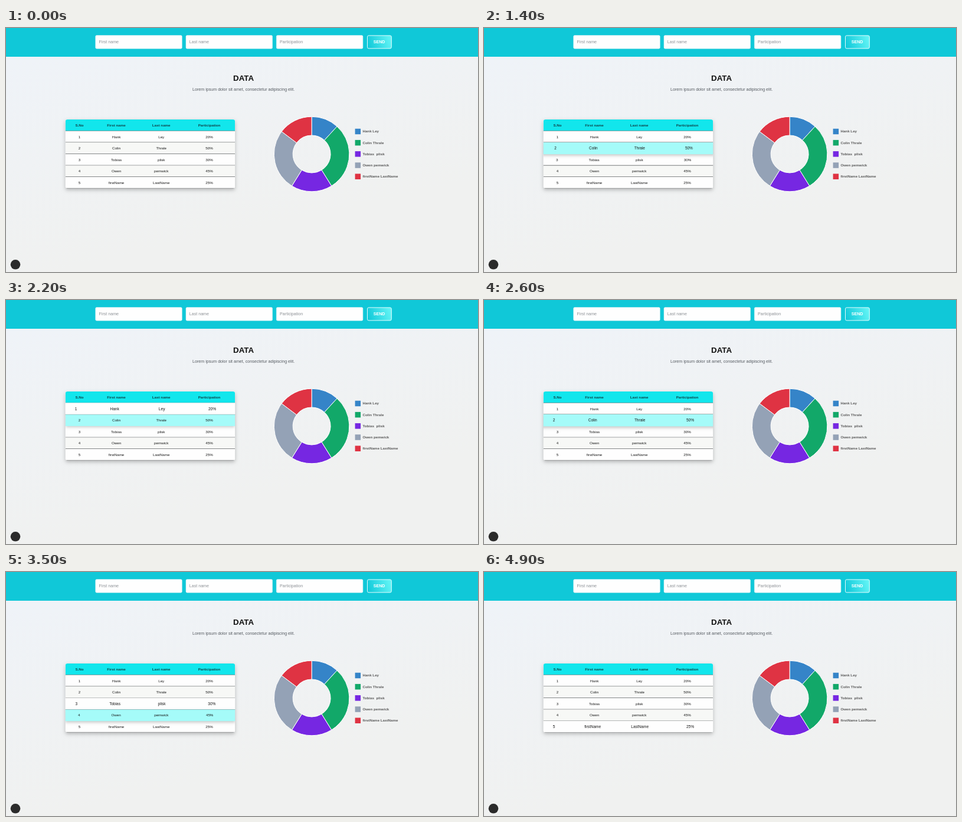
These frames come from a looping animation (800 px wide and 416 px high, 5000 ms). An HTML page with a canvas:

```html
<!DOCTYPE html>
<html lang="en">
<head>
<meta charset="utf-8">
<title>Participation data</title>
<style>
  html, body { margin: 0; width: 100%; height: 100%; overflow: hidden; }
  canvas { display: block; width: 800px; height: 416px; }
</style>
</head>
<body>
<canvas id="stage"></canvas>
<script>
const W = 800, H = 416, LOOP = 5000, STEP = 100;
const canvas = document.getElementById('stage');
const ctx = canvas.getContext('2d');
const dpr = window.devicePixelRatio || 1;
canvas.width = W * dpr;
canvas.height = H * dpr;

const people = [
  { first: 'Hank', last: 'Ley', share: 20, color: '#3584c8' },
  { first: 'Colin', last: 'Thrale', share: 50, color: '#12a869' },
  { first: 'Tobias', last: 'plisk', share: 30, color: '#7627e2', gap: '  ' },
  { first: 'Owen', last: 'pemwick', share: 45, color: '#94a2b6' },
  { first: 'firstName', last: 'LastName', share: 25, color: '#df3343' }
];

const table = { x: 100.7, y: 156, w: 287.5, head: 19.7, row: 19.6 };
const columns = [124.5, 187, 263.2, 344.5];

// When the pointer reaches each row (-1: leaves the table)
const visits = [
  [990, 3], [1150, 2], [1285, 1], [1520, 0], [2195, 1],
  [2800, 2], [3440, 3], [4280, 4], [4885, -1]
];
const GROW = 300, ZOOM = 0.05;

// cubic-bezier(.4, 0, .2, 1)
function ease(x) {
  if (x <= 0) return 0;
  if (x >= 1) return 1;
  let lo = 0, hi = 1;
  for (let i = 0; i < 20; i++) {
    const s = (lo + hi) / 2, r = 1 - s;
    if (1.2 * s * r * r + 0.6 * s * s * r + s * s * s < x) lo = s; else hi = s;
  }
  return lo * lo * (3 - 2 * lo);
}

function hoveredRow(t) {
  let row = -1;
  for (const [start, r] of visits) if (t >= start) row = r;
  return row;
}

// 0 at rest, 1 fully enlarged; leaving early shortens the way back
function rowGrowth(row, t) {
  let growth = 0;
  visits.forEach(([start, r], i) => {
    if (r !== row || t < start) return;
    const end = visits[i + 1][0];
    const peak = ease((Math.min(t, end) - start) / GROW);
    const back = t > end ? ease((t - end) / (GROW * peak)) : 0;
    growth = Math.max(growth, peak * (1 - back));
  });
  return growth;
}

function text(str, x, y, size, color, { bold = false, align = 'center' } = {}) {
  ctx.font = `${bold ? 'bold ' : ''}${size}px "Liberation Sans", Arial, sans-serif`;
  ctx.textAlign = align;
  ctx.textBaseline = 'alphabetic';
  ctx.fillStyle = color;
  ctx.fillText(str, x, y + size * 0.35);
}

function roundBox(x, y, w, h, r) {
  ctx.beginPath();
  ctx.roundRect(x, y, w, h, r);
}

function shadow(color, blur, dy) {
  ctx.shadowColor = color;
  ctx.shadowBlur = blur * dpr;
  ctx.shadowOffsetY = dy * dpr;
}

function gradient(x0, y0, x1, y1, from, to) {
  const g = ctx.createLinearGradient(x0, y0, x1, y1);
  g.addColorStop(0, from);
  g.addColorStop(1, to);
  return g;
}

function drawPage() {
  ctx.fillStyle = gradient(0, 49, 80, H, '#eff3f8', '#f0f1f0');
  ctx.fillRect(0, 0, W, H);
  ctx.fillStyle = '#10c8d8';
  ctx.fillRect(0, 0, W, 49);

  ['First name', 'Last name', 'Participation'].forEach((label, i) => {
    const x = 151.7 + i * 153.3;
    roundBox(x, 12.6, 146.6, 22.6, 2);
    ctx.fillStyle = '#fefefe';
    ctx.fill();
    ctx.strokeStyle = '#d3eff2';
    ctx.lineWidth = 0.6;
    ctx.stroke();
    text(label, x + 5.8, 23.8, 7.11, '#8d9196', { align: 'left' });
  });

  roundBox(612.5, 12.9, 40.8, 22, 2.2);
  ctx.fillStyle = gradient(614, 30, 652, 18, '#12cada', '#62f4f5');
  ctx.fill();
  ctx.strokeStyle = '#eafcfd';
  ctx.lineWidth = 1;
  ctx.stroke();
  text('SEND', 632.6, 23.9, 7.11, '#fff', { bold: true });

  text('DATA', 402.6, 85.2, 13.33, '#111', { bold: true });
  text('Lorem ipsum dolor sit amet, consectetur adipiscing elit.',
    402.6, 104.9, 7.11, '#555a60');

  ctx.beginPath();
  ctx.arc(16, 403.3, 8.3, 0, Math.PI * 2);
  ctx.fillStyle = '#2b2b2b';
  ctx.fill();
}

function drawRow(i, growth, hovered) {
  const { x, w, row } = table;
  const top = table.y + table.head + i * row;
  const mid = top + row / 2, cx = x + w / 2;
  const zoom = 1 + ZOOM * growth;
  const person = people[i];

  ctx.save();
  ctx.translate(cx, mid);
  ctx.scale(zoom, zoom);
  ctx.translate(-cx, -mid);
  ctx.save();
  if (hovered) shadow('rgba(0,0,0,0.22)', 5, 2.5);
  ctx.fillStyle = hovered ? '#a5fbf9' : i % 2 ? '#f7f8f6' : '#fefefe';
  ctx.fillRect(x, top, w, row);
  ctx.restore();
  if (!hovered) {
    ctx.fillStyle = '#55585a';
    ctx.fillRect(x, top + row - 0.8, w, 0.8);
  }
  [i + 1, person.first, person.last, person.share + '%'].forEach((cell, c) =>
    text(String(cell), columns[c], mid - 0.1, 6.22, '#161616'));
  ctx.restore();
}

function drawTable(t) {
  const { x, y, w, head, row } = table;
  const height = head + row * people.length;

  ctx.save();
  shadow('rgba(0,0,0,0.25)', 6, 2.5);
  roundBox(x, y, w, height, 3.5);
  ctx.fillStyle = '#fff';
  ctx.fill();
  ctx.restore();

  ctx.save();
  roundBox(x, y, w, height, 3.5);
  ctx.clip();
  ctx.fillStyle = '#12e6ec';
  ctx.fillRect(x, y, w, head);
  ctx.fillStyle = '#55585a';
  ctx.fillRect(x, y + head - 0.8, w, 0.8);
  ['S.No', 'First name', 'Last name', 'Participation'].forEach((label, c) =>
    text(label, columns[c], y + 9.9, 6.22, '#0f4349', { bold: true }));

  // Enlarged rows lie over resting ones, the hovered row on top
  const hovered = hoveredRow(t);
  people.map((_, i) => ({ i, growth: rowGrowth(i, t) }))
    .sort((a, b) => (a.i === hovered) - (b.i === hovered) || a.growth - b.growth)
    .forEach(({ i, growth }) => drawRow(i, growth, i === hovered));
  ctx.restore();
}

function drawChart() {
  const cx = 518.1, cy = 215, outer = 63.8, inner = 32;
  const total = people.reduce((sum, p) => sum + p.share, 0);
  let from = -Math.PI / 2;

  people.forEach((p, i) => {
    const to = from + p.share / total * Math.PI * 2;
    ctx.beginPath();
    ctx.arc(cx, cy, outer, from, to);
    ctx.arc(cx, cy, inner, to, from, true);
    ctx.closePath();
    ctx.fillStyle = p.color;
    ctx.fill();
    ctx.strokeStyle = '#fff';
    ctx.lineWidth = 1;
    ctx.stroke();
    from = to;

    const y = 176.4 + i * 19.2;
    ctx.fillStyle = p.color;
    ctx.fillRect(591.6, y - 4.7, 9.5, 9.5);
    text(p.first + (p.gap || ' ') + p.last, 604.4, y - 0.1, 6.22, '#5a5a5a',
      { bold: true, align: 'left' });
  });
}

function render(t) {
  ctx.setTransform(dpr, 0, 0, dpr, 0, 0);
  drawPage();
  drawTable(t);
  drawChart();
}

const begin = performance.now();
function tick() {
  const t = (performance.now() - begin) % LOOP;
  render(Math.floor(t / STEP) * STEP);
  requestAnimationFrame(tick);
}
tick();
</script>
</body>
</html>
```
